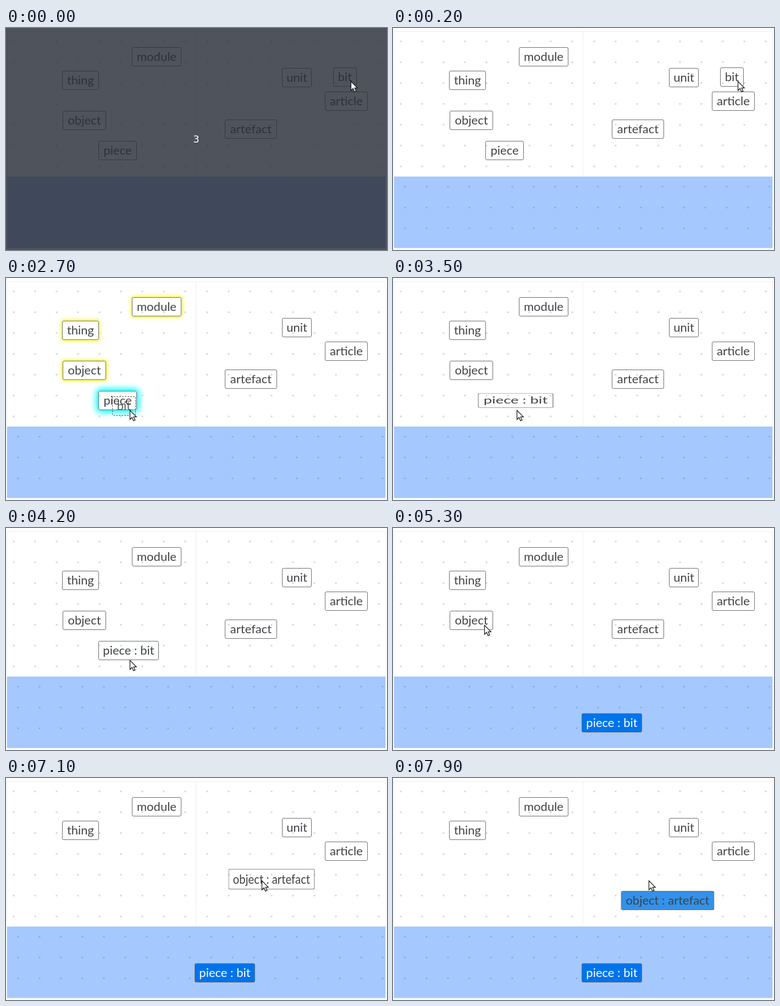
Recreate the animation shown at these times as an HTML page. Size 693 px wide and 405 px high, loop 8000 ms.

```html
<!DOCTYPE html>
<html lang="en">
<head>
<meta charset="utf-8">
<title>Word merging</title>
<style>
  html, body { margin: 0; width: 100%; height: 100%; overflow: hidden; background: #fff; }
  #stage { position: relative; width: 693px; height: 405px; overflow: hidden; }
  #board { position: absolute; left: 0; top: 0; }

  .word {
    position: absolute; left: var(--x); top: var(--y); width: var(--w); height: 35px;
    box-sizing: border-box; border: 1px solid #6b6d71; border-radius: 3px;
    font: 22px/31px Lato, sans-serif; color: #404246;
    text-align: center; white-space: nowrap;
  }
  .left   { animation: glow-left 8s step-end infinite; }
  .right  { animation: glow-right 8s step-end infinite; }
  .bit    { animation: bit-out 8s step-end infinite; }
  .object { animation: glow-left 8s step-end infinite, object-out 8s step-end infinite; }
  .piece  { animation: piece 8s step-end infinite; }
  .artefact { animation: artefact 8s step-end infinite; }

  @keyframes glow-left  { 19.375% { box-shadow: 0 0 6px 2px #fbfb2c; } 40% { box-shadow: none; } }
  @keyframes glow-right { 68.75% { box-shadow: 0 0 6px 2px #fbfb2c; } 83.4375% { box-shadow: none; } }
  @keyframes bit-out    { 19.375%, to { visibility: hidden; } }
  @keyframes object-out { 68.75%, to { visibility: hidden; } }
  @keyframes piece {
    19.375% { box-shadow: 0 0 6px 2px #fbfb2c; }
    28.125% { box-shadow: 0 0 12px 4px #0ff; }
    40%, to { visibility: hidden; }
  }
  @keyframes artefact {
    68.75% { box-shadow: 0 0 6px 2px #fbfb2c; }
    75.4375% { box-shadow: 0 0 12px 4px #0ff; }
    83.4375%, to { visibility: hidden; }
  }

  /* Merged words: appear, wobble, then travel to the blue tray. */
  .merged { visibility: hidden; }
  .pair1 { animation: show1 8s step-end infinite, move1 8s ease infinite, paint1 8s linear infinite; }
  .pair2 { animation: show2 8s step-end infinite, move2 8s ease infinite, paint2 8s linear infinite; }

  @keyframes show1 { 40%, to { visibility: visible; } }
  @keyframes show2 { 83.4375%, to { visibility: visible; } }
  @keyframes move1 {
    0%, 40%  { transform: none; }
    43.75%   { transform: scale(1.25, .75); }
    45%      { transform: scale(.75, 1.25); }
    46.25%   { transform: scale(1.15, .85); }
    48.125%  { transform: scale(.95, 1.05); }
    49.375%  { transform: scale(1.05, .95); }
    52.5%    { transform: translate(0, 0); animation-timing-function: ease-in-out; }
    60%, to  { transform: translate(175px, 132px); }
  }
  @keyframes move2 {
    0%, 83.4375% { transform: none; }
    87.1875% { transform: scale(1.25, .75); }
    88.4375% { transform: scale(.75, 1.25); }
    89.6875% { transform: scale(1.15, .85); }
    91.5625% { transform: scale(.95, 1.05); }
    92.8125% { transform: scale(1.05, .95); }
    95.9375% { transform: translate(0, 0); animation-timing-function: ease-in; }
    to       { transform: translate(30px, 71px); }
  }
  @keyframes paint1 {
    0%, 52.5%   { background: #fff0; color: #404246; }
    55.3125%    { background: #3391e9; color: #404246; }
    56.875%     { background: #0074ec; color: #404246; }
    58.125%, to { background: #0074ec; color: #fff; }
  }
  @keyframes paint2 {
    0%, 95.9375% { background: #fff0; }
    98.75%       { background: #3391e9; }
    to           { background: #1280eb; }
  }

  /* The pointer carries the dragged words. */
  #pointer { position: absolute; left: 0; top: 0; animation: pointer 8s ease-in-out infinite; }
  #pointer svg { position: absolute; left: -1px; top: -1px; }
  @keyframes pointer {
    0%, 19.375%    { transform: translate(627px, 97px); }
    31.25%, 53.75% { transform: translate(225px, 241px); }
    61.25%, 68.75% { transform: translate(166px, 177px); }
    79.375%, to    { transform: translate(465px, 187px); }
  }
  .ghost { visibility: hidden; border: 1px dashed #333; opacity: .85; }
  .drag1 { animation: drag1 8s step-end infinite; }
  .drag2 { animation: drag2 8s step-end infinite; }
  @keyframes drag1 { 19.375% { visibility: visible; } 40% { visibility: hidden; } }
  @keyframes drag2 { 68.75% { visibility: visible; } 83.4375% { visibility: hidden; } }

  #countdown {
    position: absolute; inset: 0; background: rgba(41, 46, 55, .82); color: #fff;
    font: 18px/405px "DejaVu Sans", sans-serif; text-align: center; text-indent: -1px;
    animation: countdown 8s step-end infinite;
  }
  @keyframes countdown { 2.5%, to { visibility: hidden; } }
</style>
</head>
<body>
<div id="stage">
  <svg id="board" width="693" height="405">
    <defs>
      <path id="mark" d="M-1.5-1.5l3 3m0-3l-3 3"/>
      <pattern id="dots-left" x="2" y="7" width="39" height="38" patternUnits="userSpaceOnUse">
        <use href="#mark" x="12" y="17.5" stroke="#bfc1c4"/>
      </pattern>
      <pattern id="dots-right" x="346" y="7" width="39" height="38" patternUnits="userSpaceOnUse">
        <use href="#mark" x="20" y="17.5" stroke="#bfc1c4"/>
      </pattern>
      <pattern id="dots-tray" x="2" y="271" width="39" height="38" patternUnits="userSpaceOnUse">
        <use href="#mark" x="20" y="18.5" stroke="#7f9bc8"/>
      </pattern>
    </defs>
    <path d="M1.5 401V6.5h689V401M345.5 7v264" fill="none" stroke="#eee"/>
    <rect x="2" y="7" width="343" height="264" fill="url(#dots-left)"/>
    <rect x="346" y="7" width="344" height="264" fill="url(#dots-right)"/>
    <rect x="2" y="271" width="688" height="130" fill="#a5c8ff"/>
    <rect x="2" y="271" width="688" height="130" fill="url(#dots-tray)"/>
    <path d="M2 401.5h688" stroke="#e4e8ee"/>
  </svg>

  <div class="word left" style="--x:229px;--y:35px;--w:90px">module</div>
  <div class="word left" style="--x:102px;--y:78px;--w:67px">thing</div>
  <div class="word object" style="--x:103px;--y:151px;--w:79px">object</div>
  <div class="word piece" style="--x:168px;--y:206px;--w:70px">piece</div>
  <div class="word right" style="--x:502px;--y:73px;--w:54px">unit</div>
  <div class="word bit" style="--x:595px;--y:72px;--w:43px">bit</div>
  <div class="word right" style="--x:580px;--y:116px;--w:78px">article</div>
  <div class="word artefact" style="--x:398px;--y:167px;--w:95px">artefact</div>
  <div class="word merged pair1" style="--x:168px;--y:206px;--w:110px">piece : bit</div>
  <div class="word merged pair2" style="--x:398px;--y:167px;--w:170px">object : artefact</div>

  <div id="countdown">3</div>

  <div id="pointer">
    <div class="word ghost drag1" style="--x:-32px;--y:-25px;--w:43px">bit</div>
    <div class="word ghost drag2" style="--x:-63px;--y:-26px;--w:79px">object</div>
    <svg width="16" height="24">
      <path d="M1.5 1.5V18l3.8-3.6 2.6 6 2.9-1.2-2.6-5.9h5z" fill="#fff" stroke="#111" stroke-width="1.2"/>
    </svg>
  </div>
</div>
</body>
</html>
```
